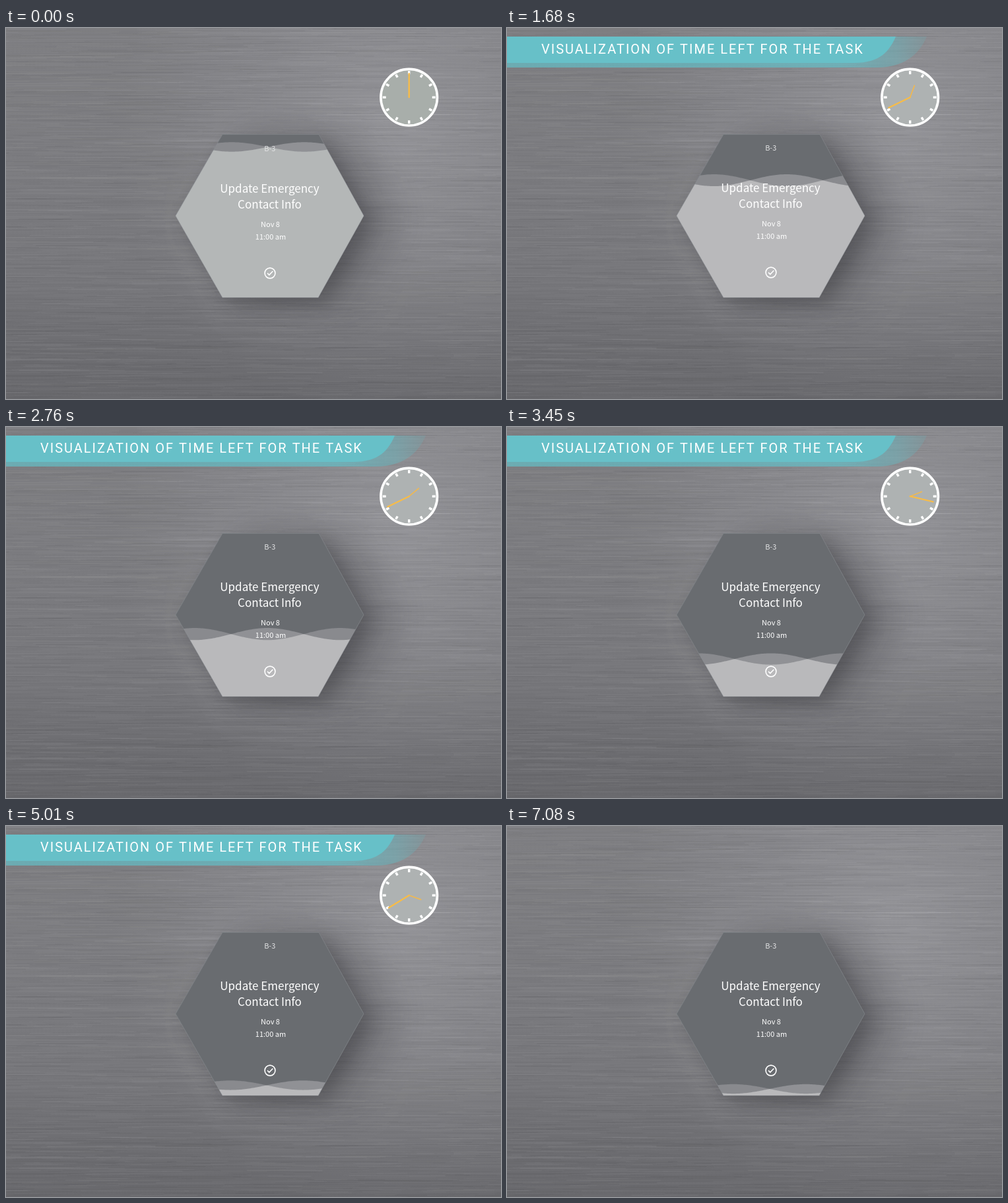
An HTML page with a canvas that plays this animation: 750x563 px, repeating every 7110 ms.

```html
<!DOCTYPE html>
<html lang="en">
<head>
<meta charset="utf-8">
<title>Time left for the task</title>
<style>
  html, body { margin: 0; width: 100%; height: 100%; overflow: hidden; background: #7c7c80; }
  canvas { display: block; }
</style>
</head>
<body>
<canvas id="stage" width="750" height="563"></canvas>
<script>
const W = 750, H = 563, LOOP = 7110;
const ctx = document.getElementById('stage').getContext('2d');
const SANS = '"Noto Sans CJK SC", "Noto Sans CJK JP", "Open Sans", sans-serif';

// Keyframes: [time, value]
const LEVEL = [[0, 180.5], [1140, 200], [2190, 271], [2880, 322], [3450, 352], [4350, 384], [5760, 398.5], [7110, 399]];
const CREST = [[0, 342], [1140, 345], [2190, 285], [3450, 290], [4350, 340], [5760, 340], [7110, 343]];
const MINUTE = [[0, 0], [850, 0], [1140, 68.5], [2190, 421], [3450, 823], [4350, 1117], [5760, 1542], [7110, 1950]];

const clamp = v => Math.max(0, Math.min(1, v));
const ramp = (t, a, b) => clamp((t - a) / (b - a));

// Monotone cubic interpolation
function along(keys, t) {
  const secant = i => (keys[i + 1][1] - keys[i][1]) / (keys[i + 1][0] - keys[i][0]);
  const slope = i => {
    if (i === 0 || i === keys.length - 1) return 0.6 * secant(i ? i - 1 : 0);
    const a = secant(i - 1), b = secant(i);
    return a * b <= 0 ? 0 : 2 * a * b / (a + b);
  };
  let i = 0;
  while (i < keys.length - 2 && t >= keys[i + 1][0]) i++;
  const [t0, v0] = keys[i], [t1, v1] = keys[i + 1];
  const d = t1 - t0, u = (t - t0) / d, u2 = u * u, u3 = u2 * u;
  return v0 * (2 * u3 - 3 * u2 + 1) + v1 * (3 * u2 - 2 * u3)
    + d * (slope(i) * (u3 - 2 * u2 + u) + slope(i + 1) * (u3 - u2));
}

const hexagon = new Path2D('M328 161.5H474L542 285L473 409H328L257 285Z');

function makeBackdrop() {
  const canvas = document.createElement('canvas');
  canvas.width = W;
  canvas.height = H;
  const c = canvas.getContext('2d');
  const paint = (gradient, ...stops) => {
    stops.forEach(([at, color]) => gradient.addColorStop(at, color));
    c.fillStyle = gradient;
    c.fillRect(0, 0, W, H);
  };
  paint(c.createLinearGradient(0, 0, 0, H), [0, '#7e7e82'], [0.3, '#7c7c80'], [0.65, '#77777b'], [1, '#68686c']);
  paint(c.createRadialGradient(590, 160, 30, 590, 160, 430),
    [0, 'rgba(168,168,173,.5)'], [0.5, 'rgba(160,160,165,.27)'], [1, 'rgba(160,160,165,0)']);

  let seed = 7;
  const rnd = () => (seed = seed * 16807 % 2147483647) / 2147483647;
  for (let i = 0; i < 5200; i++) {
    const shade = rnd() < 0.5 ? 255 : 30;
    c.fillStyle = `rgba(${shade},${shade},${shade},${0.01 + rnd() * 0.035})`;
    c.fillRect(rnd() * 900 - 150, rnd() * H, 20 + rnd() * 180, 0.6 + rnd() * 0.9);
  }

  const shadow = (dx, dy, blur, alpha) => {
    c.shadowColor = `rgba(45,45,50,${alpha})`;
    c.shadowOffsetX = dx;
    c.shadowOffsetY = dy;
    c.shadowBlur = blur;
    c.fillStyle = '#696c70';
    c.fill(hexagon);
  };
  shadow(46, 4, 60, 0.34);
  shadow(12, 10, 26, 0.3);
  return canvas;
}
const backdrop = makeBackdrop();

function label(text, x, y, font, align = 'center', spacing = '0px') {
  ctx.font = font;
  ctx.textAlign = align;
  ctx.letterSpacing = spacing;
  ctx.fillText(text, x, y);
}

function fillBelow(top, color) {
  ctx.beginPath();
  ctx.moveTo(250, 415);
  for (let x = 250; x <= 550; x += 2) ctx.lineTo(x, top(x));
  ctx.lineTo(550, 415);
  ctx.fillStyle = color;
  ctx.fill();
}

function drawTile(t) {
  const level = along(LEVEL, t), crest = along(CREST, t);
  const amp = 7.2 + 2 * Math.sin(Math.PI * ramp(t, 0, 4600));
  const swell = x => amp * Math.cos((x - crest) * Math.PI / 110);
  const back = x => level - swell(x), front = x => level + swell(x);

  ctx.save();
  ctx.clip(hexagon);
  ctx.fillStyle = '#696c70';
  ctx.fillRect(250, 155, 300, 260);
  fillBelow(back, '#898a8e');
  fillBelow(front, '#909195');
  fillBelow(x => Math.max(back(x), front(x)), t < 750 ? '#b4b7b7' : '#b9b9bb');
  ctx.restore();
  ctx.strokeStyle = 'rgba(150,153,157,.45)';
  ctx.lineWidth = 1;
  ctx.stroke(hexagon);

  const dy = 1 - ramp(t, 0, 1000);
  ctx.save();
  ctx.translate(0, dy);
  ctx.fillStyle = '#e2e3e4';
  label('B-3', 399.7, 186, '11px ' + SANS);
  ctx.fillStyle = '#fff';
  label('Update Emergency', 399.5, 249, '17px ' + SANS);
  label('Contact Info', 399.5, 273, '17px ' + SANS);
  label('Nov 8', 400.5, 301, '11px ' + SANS);
  label('11:00 am', 401, 320, '11px ' + SANS);
  ctx.strokeStyle = '#fff';
  ctx.lineWidth = 1.6;
  ctx.lineCap = 'butt';
  ctx.beginPath();
  ctx.arc(400, 371, 7.9, 0, 7);
  ctx.moveTo(396, 371);
  ctx.lineTo(398.8, 373.8);
  ctx.lineTo(404.3, 368);
  ctx.stroke();
  ctx.restore();
}

function spoke(degrees, from, to, width, color) {
  ctx.save();
  ctx.rotate(degrees * Math.PI / 180);
  ctx.beginPath();
  ctx.moveTo(0, -from);
  ctx.lineTo(0, -to);
  ctx.lineWidth = width;
  ctx.strokeStyle = color;
  ctx.stroke();
  ctx.restore();
}

function drawClock(t) {
  const minute = along(MINUTE, t);
  ctx.save();
  ctx.globalAlpha = 1 - ramp(t, 6480, 7060);
  ctx.translate(610.7, 105.2);
  ctx.beginPath();
  ctx.arc(0, 0, 42.8, 0, 7);
  ctx.fillStyle = t < 750 ? '#a8aeaa' : '#aeb2b2';
  ctx.fill();
  ctx.lineWidth = 3.6;
  ctx.strokeStyle = '#fff';
  ctx.stroke();
  ctx.lineCap = 'butt';
  for (let i = 0; i < 12; i++) spoke(i * 30, 35, 40, 3.4, '#fff');
  ctx.lineCap = 'round';
  spoke(minute / 12, 0, 19, 1.7, '#f0b850');
  spoke(minute, 0, 36, 2.3, '#f7bc48');
  ctx.restore();
}

function drawBanner(t) {
  const slide = start => {
    const enter = Math.pow(1 - ramp(t, start, start + 1250), 3);
    const leave = Math.pow(ramp(t, 6500, 7050), 2);
    return -650 * Math.max(enter, leave);
  };
  ctx.save();
  ctx.translate(slide(0), 0);
  const haze = ctx.createLinearGradient(500, 0, 640, 0);
  haze.addColorStop(0, 'rgba(100,188,196,.72)');
  haze.addColorStop(0.65, 'rgba(105,180,188,.5)');
  haze.addColorStop(1, 'rgba(115,165,172,.28)');
  ctx.fillStyle = haze;
  ctx.fill(new Path2D('M-20 13H636C628 32 609 60 560 60H-20Z'));
  ctx.restore();

  ctx.save();
  ctx.translate(slide(90), 0);
  ctx.fillStyle = '#67c0c8';
  ctx.fill(new Path2D('M-120 13H589C580 34 566 53 526 53H-120Z'));
  ctx.restore();

  ctx.save();
  ctx.globalAlpha = ramp(t, 450, 1000) * (1 - ramp(t, 6500, 6800));
  ctx.fillStyle = '#fff';
  label('VISUALIZATION OF TIME LEFT FOR THE TASK', 52, 38.5, '20px Roboto, sans-serif', 'left', '2px');
  ctx.restore();
}

const begin = performance.now();
function draw(now) {
  const t = Math.max(0, now - begin) % LOOP;
  ctx.drawImage(backdrop, 0, 0);
  drawBanner(t);
  drawClock(t);
  drawTile(t);
  requestAnimationFrame(draw);
}
draw(begin);
</script>
</body>
</html>
```
